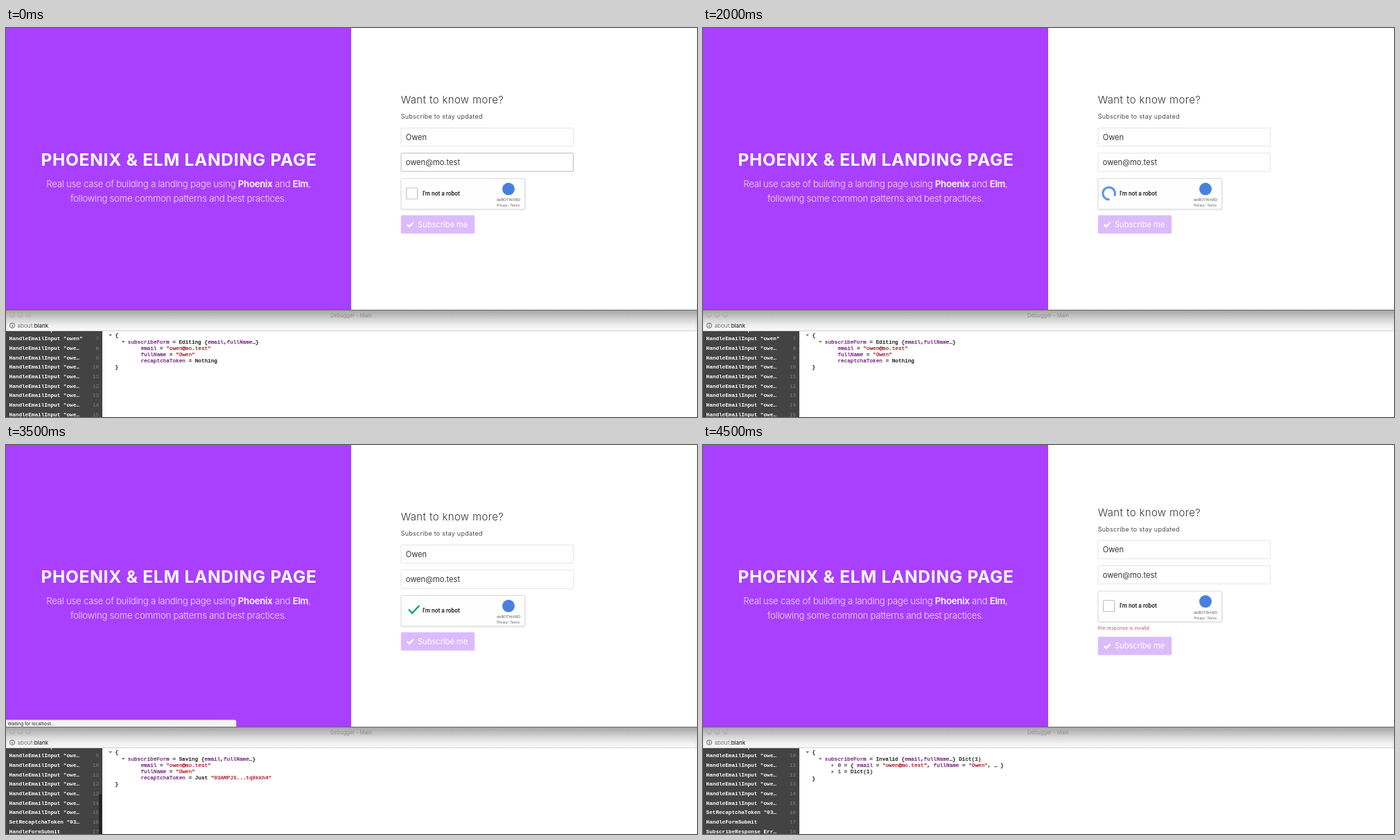
Write an HTML page that moves like this. It is 997 by 562 pixels and loops after 4.6 s.

```html
<!DOCTYPE html>
<html lang="en">
<head>
<meta charset="utf-8">
<title>Landing page with debugger</title>
<style>
  html, body { margin: 0; width: 100%; height: 100%; overflow: hidden; background: #fff; }
  svg { display: block; width: 997px; height: 562px; }
  text { font-family: Inter, "Open Sans", sans-serif; white-space: pre; }
  .mono text { font: 7.68px "Liberation Mono", "DejaVu Sans Mono", monospace; }
  .tree text { fill: #111; stroke: #111; stroke-width: .25; }
  .tree .key { fill: #6f1a7c; stroke: #6f1a7c; }
  .tree .str { fill: #a81c28; stroke: #a81c28; }
  .mono .msg { font-weight: bold; fill: #fff; }
  .mono .num { fill: #808080; text-anchor: end; }
  .mid { text-anchor: middle; }
  .robot text { font-family: Roboto, Arial, sans-serif; }
  .field { fill: #fff; stroke: #e4e4e4; }
  .field.focus { stroke: #bababa; }
</style>
</head>
<body>
<svg viewBox="0 0 997 562">
  <defs>
    <linearGradient id="bar" x2="0" y2="1">
      <stop offset="0" stop-color="#a6a6a6"/>
      <stop offset=".25" stop-color="#c0c0c0"/>
      <stop offset=".5" stop-color="#dadada"/>
      <stop offset=".75" stop-color="#f1f1f1"/>
      <stop offset="1" stop-color="#fafafa"/>
    </linearGradient>
    <clipPath id="side"><path d="M0 438H139V562H0Z"/></clipPath>
  </defs>

  <rect width="997" height="562" fill="#fff"/>
  <rect width="498" height="407.5" fill="#a93fff"/>
  <text class="mid" x="249.5" y="198.5" font-size="24.4" font-weight="700" letter-spacing=".78" fill="#fff">PHOENIX &amp; ELM LANDING PAGE</text>
  <g class="mid" font-size="13.2" font-weight="300" letter-spacing="-.25" fill="#f0dfff">
    <text x="249" y="230">Real use case of building a landing page using <tspan font-weight="600" fill="#fff">Phoenix</tspan> and <tspan font-weight="600" fill="#fff">Elm</tspan>,</text>
    <text x="249" y="251.3">following some common patterns and best practices.</text>
  </g>

  <g id="form">
    <text x="569.7" y="109" font-size="15" font-weight="300" letter-spacing=".35" fill="#363636">Want to know more?</text>
    <text x="569.7" y="131.2" font-size="9" letter-spacing=".26" fill="#4a4a4a">Subscribe to stay updated</text>
    <rect class="field" x="570" y="144.5" width="248.5" height="26.3" rx="1.5"/>
    <rect class="field" id="email" x="570" y="180.8" width="248.5" height="26.4" rx="1.5"/>
    <g font-size="11.15" fill="#363636">
      <text x="576.7" y="161.7">Owen</text>
      <text id="address-text" x="576.7" y="198">owen@mo.test</text>
    </g>
    <path id="caret" d="M0 187.5V201" stroke="#222" stroke-width=".9"/>
    <g class="robot">
      <rect x="570.3" y="218" width="178.6" height="44.6" rx="1.8" fill="none" stroke="#ececec" stroke-width="1.6"/>
      <rect x="570" y="217.5" width="178.6" height="44.3" rx="1.8" fill="#fefefe" stroke="#d3d3d3" stroke-width=".8"/>
      <rect id="box" fill="#fff" stroke="#c1c1c1" stroke-width="1.2"/>
      <circle id="pulse" cx="585.7" cy="239" fill="#f4f8fe" stroke="#c8dcf8" stroke-width="3.6"/>
      <path id="spin" fill="none" stroke="#5b95ee" stroke-width="3"/>
      <path id="tick" d="M581 237.5L586 243L596.3 232" fill="none" stroke="#1aa567" stroke-width="2.5" pathLength="1" stroke-dasharray="1 2"/>
      <text x="601" y="241.8" font-size="8.4" font-weight="500" fill="#111">I'm not a robot</text>
      <circle cx="725" cy="232.6" r="9" fill="#4a80dc"/>
      <text class="mid" x="725" y="250" font-size="5.9" fill="#666">deBOTWARD</text>
      <text class="mid" x="724.6" y="258" font-size="4.8" fill="#666">Privacy - Terms</text>
    </g>
  </g>
  <text id="error" x="569.7" y="267" font-size="7.05" fill="#cb5570">the response is invalid</text>
  <g id="button">
    <rect id="button-bg" x="569.8" y="270.4" width="106.4" height="26.6" rx="1.6"/>
    <path d="M578.8 284L581.8 287L587.6 281" fill="none" stroke="#fff" stroke-width="2.4"/>
    <text x="594" y="287.8" font-size="11.1" fill="#fff">Subscribe me</text>
  </g>

  <g id="status">
    <path d="M0 397.2H330Q332 397.2 332 399.2V407.5H0Z" fill="#f3f3f3" stroke="#d0d0d0" stroke-width=".6"/>
    <text x="2.5" y="404.5" font-size="6.45" fill="#222">Waiting for localhost...</text>
  </g>

  <rect y="408" width="997" height="30" fill="url(#bar)"/>
  <rect y="407" width="997" height="1" fill="#6a6a6a"/>
  <g fill="#b9b9b9" stroke="#a6a6a6" stroke-width=".6">
    <circle cx="9" cy="414.6" r="3.3"/><circle cx="20.6" cy="414.6" r="3.3"/><circle cx="32.2" cy="414.6" r="3.3"/>
  </g>
  <text class="mid" x="498" y="417.6" font-size="7.5" fill="#8c8c8c">Debugger - Main</text>
  <rect x="1" y="422.3" width="994.5" height="14.8" rx="1.5" fill="none" stroke="#dedede" stroke-width=".7"/>
  <path d="M0 437.7H997" stroke="#cfcfcf" stroke-width=".8"/>
  <circle cx="9" cy="429.8" r="3.6" fill="none" stroke="#555" stroke-width=".9"/>
  <path d="M9 427.6V428.5M9 429.2V432" stroke="#555"/>
  <text x="16.5" y="432.7" font-size="8.1" fill="#777">about:<tspan fill="#111">blank</tspan></text>

  <rect y="438" width="139" height="124" fill="#434343"/>
  <g id="log" class="mono" clip-path="url(#side)"></g>
  <rect id="thumb" x="134" y="504" width="4" height="58" rx="2" fill="#222"/>
  <g id="tree" class="mono tree"></g>
</svg>

<script>
const LOOP = 4600, STEP = 100;
const T = { caretOn: 300, caretOff: 800, click: 1000, pulse: 1200, spin: 1500,
            tick: 2400, token: 2700, submit: 3400, reply: 3600, statusOn: 3500, idle: 4000 };
const CX = 585.7, CY = 239, ROW = 13.66;
const $ = id => document.getElementById(id);
const show = (id, on) => $(id).style.display = on ? '' : 'none';
const set = (id, attrs) => { for (const k in attrs) $(id).setAttribute(k, attrs[k]); };
const clamp = v => Math.max(0, Math.min(1, v));

const line = (x, y, s) => `<text x="${x}" y="${y}">${s}</text>`;
const key = s => `<tspan class="key">${s}</tspan>`;
const str = s => `<tspan class="str">"${s}"</tspan>`;
const down = (x, y) => `<path d="M${x - 2.4} ${y - 1.2}h4.8l-2.4 3z" fill="#777"/>`;
const right = (x, y) => `<path d="M${x - 1.2} ${y - 2.4}v4.8l3 -2.4z" fill="#777"/>`;

const message = n =>
  n === 18 ? 'SubscribeResponse Err…' :
  n === 17 ? 'HandleFormSubmit' :
  n === 16 ? 'SetRecaptchaToken "03…' :
  `HandleEmailInput "${n > 7 ? 'owe…' : 'owen'.slice(0, n - 3) + '"'}`;

function log(last) {
  let out = '';
  for (let i = 0; i < 10; i++) {
    const n = last - i, y = 560.6 - i * ROW;
    out += `<text class="msg" x="4.6" y="${y}">${message(n)}</text>` +
           `<text class="num" x="134" y="${y}">${n}</text>`;
  }
  return out;
}

function tree(state, token) {
  const fields = `{${key('email')},${key('fullName')}…}`;
  let out = down(150.7, 443.8) + down(169.3, 453.3) + line(157.5, 446, '{') +
    line(175.8, 455.7, `${key('subscribeForm')} = ${state} ${fields}${state === 'Invalid' ? ' Dict(1)' : ''}`);
  if (state === 'Invalid') {
    return out + right(186.8, 462.8) + right(186.8, 472) +
      line(194.4, 465, `${key('0')} = { ${key('email')} = ${str('owen@mo.test')}, ${key('fullName')} = ${str('Owen')}, … }`) +
      line(194.4, 474.4, `${key('1')} = Dict(1)`) + line(157.5, 483.7, '}');
  }
  return out + line(194.4, 464.7, `${key('email')} = ${str('owen@mo.test')}`) +
    line(194.4, 473.6, `${key('fullName')} = ${str('Owen')}`) +
    line(194.4, 482.6, `${key('recaptchaToken')} = ${token ? 'Just ' + str('03AMPJS...tq0kkh4') : 'Nothing'}`) +
    line(157.5, 491.7, '}');
}

function arc(r, from, to) {
  const p = a => `${CX + r * Math.cos(a * Math.PI / 180)} ${CY + r * Math.sin(a * Math.PI / 180)}`;
  return `M${p(from)}A${r} ${r} 0 ${to - from > 180 ? 1 : 0} 1 ${p(to)}`;
}

let phase = '';
function debuggerPanel(t) {
  const next = t >= T.reply ? 'reply' : t >= T.submit ? 'submit' : t >= T.token ? 'token' : 'edit';
  if (next === phase) return;
  phase = next;
  $('log').innerHTML = log({ edit: 15, token: 16, submit: 17, reply: 18 }[phase]);
  $('tree').innerHTML = tree({ submit: 'Saving', reply: 'Invalid' }[phase] || 'Editing', phase !== 'edit');
}

function draw(t) {
  const invalid = t >= T.reply;
  debuggerPanel(t);
  show('caret', t >= T.caretOn && t < T.caretOff);
  $('email').classList.toggle('focus', t < T.click);

  const size = 16 * (1 - clamp((t - T.click) / (T.pulse - T.click)));
  show('box', invalid || t < T.pulse);
  const side = invalid ? 16 : size;
  set('box', { x: CX - side / 2, y: CY - side / 2, width: side, height: side, rx: side < 16 ? side / 2 : 1 });

  show('pulse', t >= T.pulse && t < T.spin);
  set('pulse', { r: 8.3 * clamp((t - T.pulse + 100) / 300) });

  show('spin', t >= T.spin && t < T.tick);
  const turn = (t - 2000) * .36, sweep = 300 - 100 * Math.abs(Math.sin((t - 2000) * Math.PI / 1000));
  set('spin', { d: arc(8.8, 85 + turn, 85 + turn + sweep) });

  show('tick', t >= T.tick && !invalid);
  set('tick', { 'stroke-dashoffset': 1 - clamp((t - T.tick + 100) / 300) });

  set('form', { transform: `translate(0 ${invalid ? -6.5 : 0})` });
  set('button', { transform: `translate(0 ${invalid ? 6.6 : 0})` });
  set('button-bg', { fill: t >= T.token && t < T.submit ? '#b258fb' : '#dcbbfd' });
  show('error', invalid);
  show('status', t >= T.statusOn && t < T.idle);
  show('thumb', t >= T.submit && t < T.idle);
}

const email = $('address-text');
set('caret', { transform: `translate(${576.7 + email.getComputedTextLength() + .8} 0)` });

const start = performance.now();
function tick() {
  const t = (performance.now() - start) % LOOP;
  draw(Math.floor(t / STEP) * STEP);
  requestAnimationFrame(tick);
}
draw(0);
requestAnimationFrame(tick);
</script>
</body>
</html>
```
